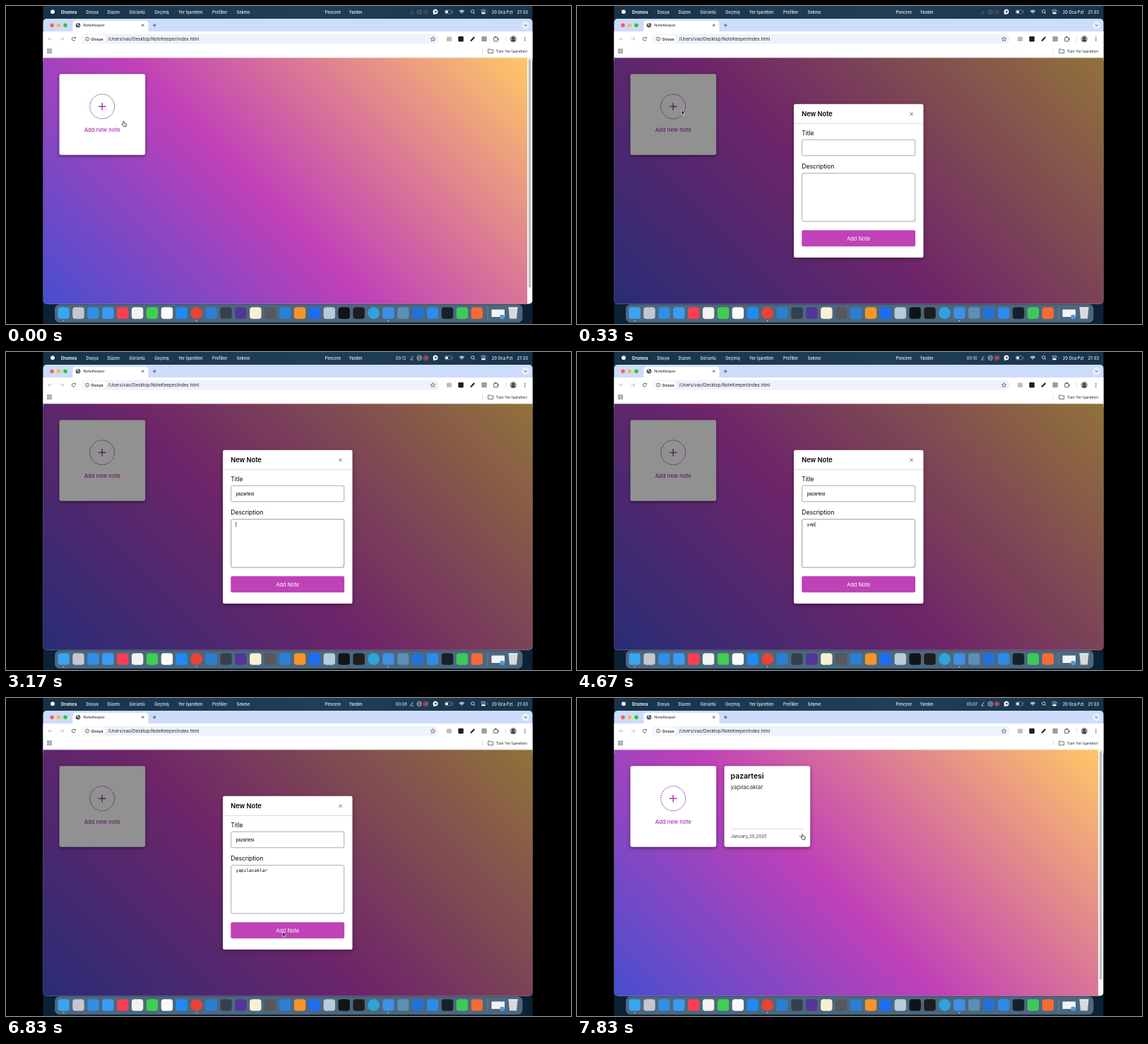
An HTML page with a canvas for the animation above (8000 ms loop, 800 by 450 pixels).

```html
<!DOCTYPE html>
<html lang="tr">
<head>
<meta charset="utf-8">
<title>NoteKeeper</title>
<style>
html, body { margin: 0; width: 100%; height: 100%; overflow: hidden; background: #000; }
canvas { display: block; width: 800px; height: 450px; }
</style>
</head>
<body>
<canvas id="stage"></canvas>
<script>
const LOOP = 8000, STEP = 1000 / 6;
const LEFT = 52.5, WIDTH = 693;
const UI = 'Inter, Roboto, sans-serif';
const ARIAL = '"Liberation Sans", Arial, sans-serif';
const MONO = '"DejaVu Sans Mono", monospace';
const PINK = '#bf42b7', PURPLE = '#a937b0', INK = '#1f2023';

const canvas = document.getElementById('stage');
const dpr = window.devicePixelRatio || 1;
canvas.width = 800 * dpr;
canvas.height = 450 * dpr;
const c = canvas.getContext('2d');
c.scale(dpr, dpr);

function box(x, y, w, h, r, fill, stroke, lw = 0.7) {
  c.beginPath();
  c.roundRect(x, y, w, h, r);
  if (fill) { c.fillStyle = fill; c.fill(); }
  if (stroke) { c.strokeStyle = stroke; c.lineWidth = lw; c.stroke(); }
}

function disc(x, y, r, fill, stroke, lw = 0.8) {
  c.beginPath();
  c.arc(x, y, r, 0, Math.PI * 2);
  if (fill) { c.fillStyle = fill; c.fill(); }
  if (stroke) { c.strokeStyle = stroke; c.lineWidth = lw; c.stroke(); }
}

function line(points, color, lw = 0.8) {
  c.beginPath();
  for (let i = 0; i < points.length; i += 2) c.lineTo(points[i], points[i + 1]);
  c.strokeStyle = color;
  c.lineWidth = lw;
  c.stroke();
}

function shape(x, y, points, fill, stroke, lw) {
  c.beginPath();
  for (let i = 0; i < points.length; i += 2) c.lineTo(x + points[i], y + points[i + 1]);
  c.closePath();
  c.fillStyle = fill;
  c.fill();
  if (stroke) { c.strokeStyle = stroke; c.lineWidth = lw; c.stroke(); }
}

function text(str, x, y, size, color, weight = 400, family = UI, align = 'left') {
  c.font = `${weight} ${size}px ${family}`;
  c.textAlign = align;
  c.fillStyle = color;
  c.fillText(str, x, y);
}

function cross(x, y, r, color, lw) {
  line([x - r, y - r, x + r, y + r], color, lw);
  line([x - r, y + r, x + r, y - r], color, lw);
}

function plus(x, y, r, color, lw) {
  line([x - r, y, x + r, y], color, lw);
  line([x, y - r, x, y + r], color, lw);
}

function withShadow(blur, alpha, draw) {
  c.save();
  c.shadowColor = `rgba(0,0,0,${alpha})`;
  c.shadowBlur = blur * dpr;
  c.shadowOffsetY = 1.5 * dpr;
  draw();
  c.restore();
}

// Menu bar
const menu = [['Dosya', 113.5], ['Düzen', 143.5], ['Görüntü', 174.5], ['Geçmiş', 210.3],
  ['Yer İşaretleri', 244], ['Profiller', 292], ['Sekme', 326.5], ['Pencere', 451.5], ['Yardım', 485.7]];

function menuBar(t) {
  const white = '#f0f4f7';
  disc(66, 8.2, 2.9, white);
  text('Drumea', 78, 10.5, 5.8, white, 700);
  for (const [label, x] of menu) text(label, x, 10.5, 5.75, white, 500);

  const fade = Math.min(1, Math.max(0, (t - 500) / 400));
  c.globalAlpha = fade;
  const left = 14 - Math.max(0, Math.floor((t - 500) / 1000));
  text('00:' + String(left).padStart(2, '0'), 551.8, 10.7, 5.7, white);
  c.globalAlpha = 0.35 + 0.65 * fade;
  line([572.5, 10.8, 576.5, 5.8], white);
  line([573, 11, 577, 11], white, 0.6);
  disc(585.3, 8.3, 3.3, null, white, 0.7);
  line([584.2, 6.8, 584.2, 9.8], white);
  line([586.4, 6.8, 586.4, 9.8], white);
  disc(594.6, 8.3, 3.4, null, '#f0565d');
  box(593, 6.7, 3.2, 3.2, 0.6, '#f0565d');
  c.globalAlpha = 1;

  disc(608, 8, 3.5, white);
  shape(605, 9, [0, 0, 0, 3.2, 3, 2], white);
  disc(608.4, 8, 1.3, '#1c3a52');
  box(621.5, 5.8, 9.5, 5, 1.4, null, '#9aa7b1', 0.6);
  box(622.3, 6.6, 3.6, 3.4, 0.7, white);
  line([632, 7.4, 632, 9.2], '#9aa7b1');
  for (const r of [1.2, 3.2, 5]) {
    c.beginPath();
    c.arc(645.3, 11, r, -Math.PI * 0.75, -Math.PI * 0.25);
    c.strokeStyle = white;
    c.lineWidth = 1.1;
    c.stroke();
  }
  disc(660.7, 7.7, 2.2, null, white);
  line([662.3, 9.3, 664.1, 11.1], white);
  box(673, 5.3, 6, 2.4, 1.2, null, white, 0.7);
  box(673, 8.9, 6, 2.4, 1.2, white);
  disc(681.7, 8.3, 0.8, '#8f62e8');
  text('20 Oca Pzt', 687.8, 10.5, 5.65, white, 500);
  text('21:33', 739, 10.5, 6, white, 500, UI, 'right');
}

// Browser window
function browser() {
  box(LEFT, 18, WIDTH, 60, [5, 5, 0, 0], '#cddcfb');
  ['#ff5f57', '#febc2e', '#28c840'].forEach((col, i) => disc(65 + i * 9.5, 27.2, 2.8, col));
  box(94.5, 20.7, 107, 18, [4.5, 4.5, 0, 0], '#fff');
  disc(102, 27.2, 3.3, '#4b4f55');
  shape(100, 25.2, [0, 0, 2, -1, 2.4, 1, 1, 2.4], '#e3e7ec');
  shape(102, 27, [0, 0, 2.2, 0.2, 1, 2.2], '#e3e7ec');
  text('NoteKeeper', 109.3, 29.1, 5.4, INK);
  cross(193.7, 27.2, 1.6, INK, 0.8);
  plus(210.3, 27.2, 2.4, '#33373c', 0.8);
  disc(735.6, 27.2, 5.5, '#e6eefd');
  line([733.8, 26.5, 735.6, 28.2, 737.4, 26.5], INK, 0.9);

  box(LEFT, 36, WIDTH, 37.3, 0, '#fff');
  line([LEFT, 73, LEFT + WIDTH, 73], '#dcdee2', 0.6);
  for (const [x, d] of [[62.5, -1], [79.3, 1]]) {
    line([x - 2.7, 46.7, x + 2.7, 46.7], '#b3b6ba');
    line([x, 44.2, x + 2.6 * d, 46.7, x, 49.2], '#b3b6ba');
  }
  c.beginPath();
  c.arc(95.8, 46.7, 2.4, 0.4, 5.6);
  c.strokeStyle = '#45494e';
  c.lineWidth = 0.9;
  c.stroke();
  shape(96.6, 43.8, [0, 2.3, 2.3, 2.3, 2.3, 0], '#45494e');

  box(106.7, 39.8, 506, 13.8, 6.9, '#edf2fb');
  box(109, 41.2, 32, 11, 5.5, '#fff');
  disc(115, 46.7, 2.7, null, '#33373c', 0.7);
  line([115, 46.3, 115, 48.2], '#33373c', 0.7);
  line([115, 44.9, 115, 45.6], '#33373c', 0.7);
  text('Dosya', 121, 48.8, 5.4, INK, 600);
  text('/Users/vao/Desktop/NoteKeeper/index.html', 144.2, 49, 6.25, '#25272b');

  const star = [];
  for (let i = 0; i < 10; i++) {
    const r = i % 2 ? 1.5 : 3.4, a = i * Math.PI / 5 - Math.PI / 2;
    star.push(r * Math.cos(a), r * Math.sin(a));
  }
  shape(604.5, 46.9, star, '#edf2fb', '#45494e', 0.7);

  box(624, 43.5, 7, 6.6, 1, '#c9b9b6');
  box(640.3, 42.9, 7.5, 7.5, 1.3, '#1c1e20');
  line([658, 49.5, 663.2, 44], '#1c1e20', 2);
  box(673.4, 43, 7.4, 7.2, 1, '#8fa58d');
  box(690.7, 44.3, 5.6, 5.6, 0.6, '#fff', '#45494e', 0.9);
  disc(693.4, 43.8, 1, '#45494e');
  disc(696.8, 47, 1, '#45494e');
  line([707.5, 43, 707.5, 50.5], '#c5d8f8', 0.8);
  disc(718.2, 46.7, 4.7, '#9b9d8f');
  disc(718.2, 45.3, 1.9, '#3c4043');
  c.beginPath();
  c.arc(718.2, 50.2, 3, Math.PI, 0);
  c.fillStyle = '#3c4043';
  c.fill();
  for (const dy of [-2.3, 0, 2.3]) disc(734.8, 46.7 + dy, 0.7, '#33373c');

  for (const x of [58.6, 62.2])
    for (const y of [60.8, 64.4]) box(x, y, 2.3, 2.3, 0.3, null, '#45494e', 0.7);
  line([674.5, 60, 674.5, 67.5], '#c5d8f8', 0.8);
  shape(682.7, 61, [0, 0, 2.6, 0, 3.5, 1, 7, 1, 7, 5.6, 0, 5.6], '#fff', '#45494e', 0.8);
  text('Tüm Yer İşaretleri', 693.7, 65.8, 5.35, INK);
}

// Web page
function page(modal, saved) {
  const top = 73.3, w = modal ? WIDTH : 685.5, h = 372, q = (w + h) / 4;
  const cx = LEFT + w / 2, cy = top + h / 2;
  const g = c.createLinearGradient(cx - q, cy + q, cx + q, cy - q);
  g.addColorStop(0, '#414fd0');
  g.addColorStop(0.46, '#c040b8');
  g.addColorStop(1, '#ffc766');
  c.save();
  c.beginPath();
  c.roundRect(LEFT, top, WIDTH, 348.2, [0, 0, 5, 5]);
  c.clip();
  box(LEFT, top, WIDTH, 349, 0, '#fafafa');
  box(LEFT, top, w, 349, 0, g);
  if (!modal) box(739.8, 75, 3.6, 323.5, 1.8, '#bfbfc1');

  card(75.5);
  c.setLineDash([2, 1.2]);
  disc(136.2, 142.2, 17.4, null, '#8f2fa3', 1);
  c.setLineDash([]);
  plus(136.2, 142.2, 5.3, PURPLE, 1.5);
  text('Add new note', 136.2, 177.7, 7.75, PURPLE, 500, UI, 'center');
  if (saved) note();
  if (modal) box(LEFT, top, WIDTH, 349, 0, 'rgba(0,0,0,.43)');
  c.restore();
}

function card(x) {
  withShadow(5, 0.5, () => box(x, 96.2, 121.7, 114.5, 2.4, '#fff'));
}

function note() {
  card(208.5);
  text('pazartesi', 217.6, 114.4, 10.4, '#000', 600);
  text('yapılacaklar', 217.6, 128.5, 8.1, '#333');
  line([218, 185.5, 321, 185.5], '#ccc', 0.7);
  text('January,20,2025', 217.6, 198.2, 6.4, '#444');
  for (const x of [315.6, 317.6, 319.6]) disc(x, 195.7, 0.65, '#555');
}

// Typed letters per step, counted from the start time of each field
const title = { word: 'pazartesi', start: 1500, counts: [1, 2, 3, 4, 4, 5, 6, 7, 9] };
const desc = { word: 'yapılacaklar', start: 4500, counts: [2, 3, 5, 6, 8, 9, 11, 12] };

function typed({ word, start, counts }, t) {
  const i = Math.round((t - start) / STEP);
  return i < 0 ? '' : word.slice(0, counts[Math.min(i, counts.length - 1)]);
}

function field(y, h, str, baseline, size, family, focus, caret) {
  box(318.7, y, 160, h, 2, '#fff', focus ? '#8894a0' : '#a0a0a0', 0.9);
  text(str, 325.4, baseline, size, '#000', 400, family);
  if (caret) {
    const x = 325.8 + c.measureText(str).width;
    line([x, baseline - 5.6, x, baseline + 1.3], '#111', 0.7);
  }
}

function dialog(t) {
  withShadow(6, 0.35, () => box(307, 138.8, 183.5, 217.3, 2.4, '#fff'));
  text('New Note', 318.3, 155.9, 9.2, '#000', 600);
  cross(473.6, 152.7, 2.1, '#555', 0.9);
  line([307, 166.5, 490.5, 166.5], '#ccc', 0.7);
  text('Title', 318.3, 182.8, 8.4, '#000');
  text('Description', 318.3, 230.3, 8.5, '#000');

  const inTitle = t >= 990 && t < 3160;
  const inDesc = t >= 3160 && t < 6160;
  const blink = t > 3660 && t < 4160;
  field(189.2, 22.6, typed(title, t), 202.8, 6.4, ARIAL, inTitle, inTitle);
  field(236.7, 68.2, typed(desc, t), 246.2, 6.2, MONO, inDesc, inDesc && !blink);
  line([475.3, 303.8, 477.7, 301.4], '#999', 0.5);
  line([476.8, 303.8, 477.7, 302.9], '#999', 0.5);

  box(318.3, 317.3, 160.8, 22.9, 2, PINK);
  text('Add Note', 398.6, 331.5, 7.4, '#fff', 400, UI, 'center');
}

// Dock
const dockColors = ('3aa5f0 c4c7d0 2f8fe8 3b9bf5 fa3f55 f2f2f0 3fce52 fbfbfb 1f8bf5 ea4335 2b7fd0 33414f ' +
  '54359a f8f0d2 55585c 2a7fd4 f5952a 1d6df0 b9cbd8 101418 1b1d1f 2fa3dc 3f8fe6 5b8fb5 2172d8 2d8bea ' +
  '16202c 3fc85a f76a35').split(' ');

function dock() {
  box(69.5, 422.7, 661.5, 24.8, 6, '#4d677d', '#667d91', 0.5);
  dockColors.forEach((hex, i) => {
    const x = 81.6 + i * 20.9;
    if (i === 9 || i === 21) disc(x, 434.5, 8.4, '#' + hex);
    else box(x - 8.2, 426.3, 16.4, 16.4, 3.8, '#' + hex);
    if (i === 0 || i === 9 || i === 22) disc(x, 445.5, 0.8, '#dfe6ec');
  });
  line([682, 426, 682, 444], '#7b91a3', 0.6);
  box(687.5, 429.5, 18.5, 10.5, 0.8, '#f1f4f6');
  box(699.5, 437, 6, 6, 1.4, '#4a9de4');
  shape(718, 434.5, [-6.5, -8, 6.5, -8, 5, 8, -5, 8], '#d6dade');
  line([711.5, 427, 724.5, 427], '#f4f6f7', 1.2);
}

// Pointer
const paths = [
  [[0, 166.8, 163], [170, 154, 152], [330, 147.3, 147], [500, 190, 160], [670, 300, 183], [830, 375, 197], [1000, 395, 201]],
  [[6170, 398, 225], [6500, 394, 300], [6830, 392, 332], [7000, 387, 288.5], [7330, 346, 228], [7670, 320.5, 195], [7830, 319.6, 192.8]]
];

function pointerAt(t) {
  const path = t < 1490 ? paths[0] : t > 6160 ? paths[1] : null;
  if (!path) return null;
  const i = path.findIndex(p => p[0] > t);
  if (i < 0) return path[path.length - 1].slice(1);
  const [t1, x1, y1] = path[i], [t0, x0, y0] = path[Math.max(0, i - 1)];
  const k = t1 > t0 ? Math.max(0, (t - t0) / (t1 - t0)) : 0;
  return [x0 + (x1 - x0) * k, y0 + (y1 - y0) * k];
}

const inside = ([x, y], l, t, r, b) => x > l && x < r && y > t && y < b;

function hand(x, y) {
  c.save();
  c.translate(x - 0.3, y);
  c.scale(0.88, 0.92);
  shape(0, 0, [-1, 0.4, 0, -0.3, 1, 0.5, 1.2, 3, 4.3, 3.8, 4.8, 5, 4, 8.4, 0, 8.4, -2.6, 5.2, -2.3, 4.2, -0.8, 5],
    '#fff', '#222', 0.8);
  line([1.6, 5.2, 1.6, 7.2], '#222', 0.5);
  line([2.9, 5.2, 2.9, 7.2], '#222', 0.5);
  c.restore();
}

function pointer(t, modal) {
  const p = pointerAt(t);
  if (!p) return;
  const [x, y] = p;
  if (!modal && (inside(p, 75, 96, 197, 211) || inside(p, 313, 190, 323, 200))) {
    hand(x, y);
  } else if (modal && (inside(p, 318, 189, 479, 212) || inside(p, 318, 236, 479, 305))) {
    line([x, y - 3.8, x, y + 3.8], '#222', 0.7);
    line([x - 1.4, y - 4, x + 1.4, y - 4], '#222', 0.6);
    line([x - 1.4, y + 4, x + 1.4, y + 4], '#222', 0.6);
  } else {
    shape(x, y, [0, 0, 0, 6.6, 1.5, 5.3, 2.6, 7.8, 3.7, 7.3, 2.6, 4.9, 4.6, 4.8], '#111', '#fff', 0.6);
  }
}

function desktop() {
  c.fillStyle = '#000';
  c.fillRect(0, 0, 800, 450);
  const sky = c.createLinearGradient(LEFT, 0, LEFT + WIDTH, 0);
  sky.addColorStop(0, '#17334a');
  sky.addColorStop(0.55, '#203f57');
  sky.addColorStop(1, '#17334a');
  box(LEFT, 0, WIDTH, 225, 0, sky);
  box(LEFT, 225, WIDTH, 225, 0, '#0d2134');
}

function render(ms) {
  const t = Math.floor((ms % LOOP + 4) / STEP) * STEP;
  const modal = t > 320 && t < 6990;
  desktop();
  menuBar(t);
  browser();
  page(modal, t > 6990);
  if (modal) dialog(t);
  dock();
  pointer(t, modal);
}

const begin = performance.now();
function tick() {
  render(performance.now() - begin);
  requestAnimationFrame(tick);
}
tick();
</script>
</body>
</html>
```
